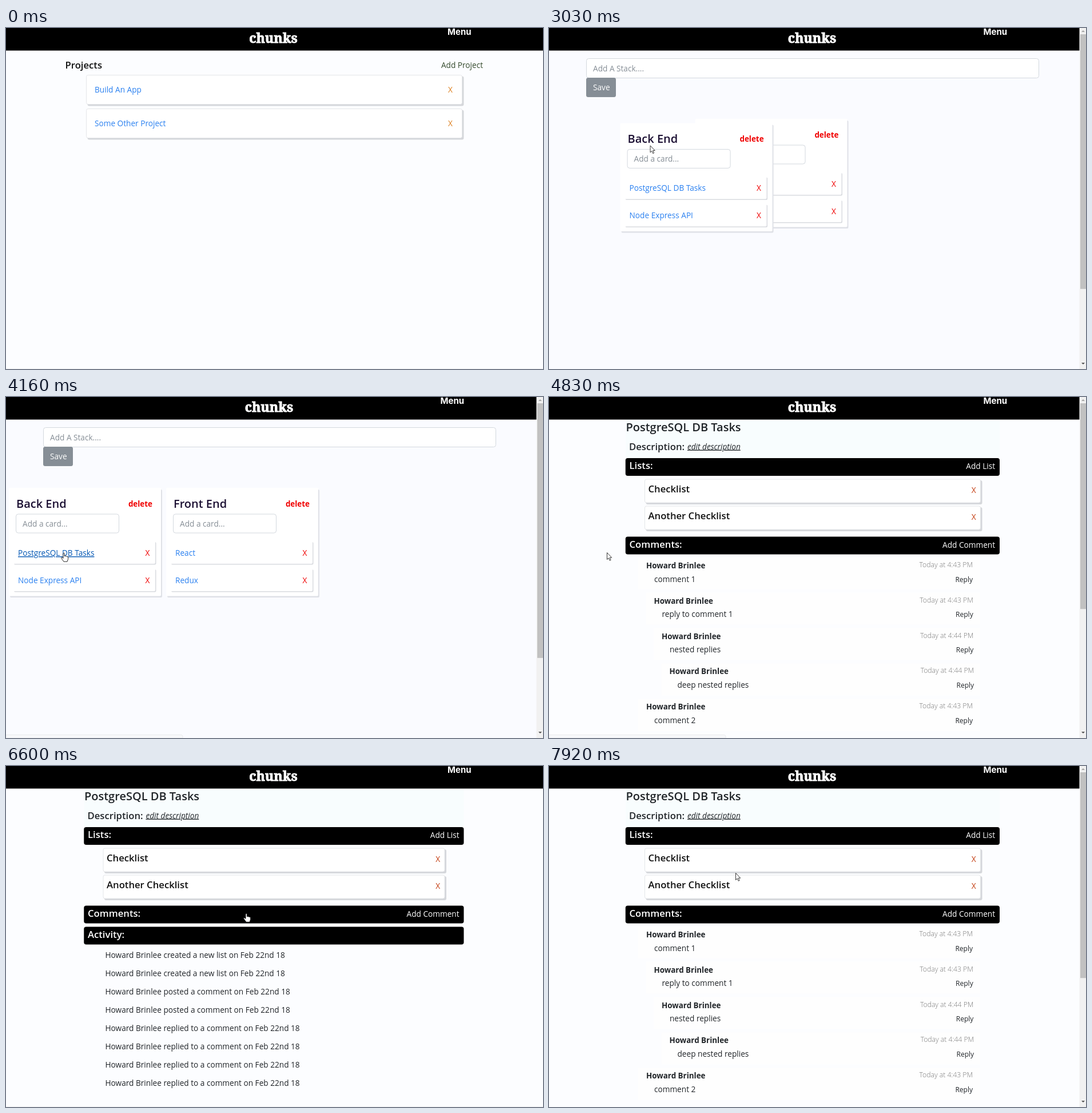
Write an HTML page that moves like this. It is 939 by 597 pixels and loops after 7990 ms.

```html
<!DOCTYPE html>
<html lang="en">
<head>
<meta charset="utf-8">
<title>Project board</title>
<style>
html, body { margin: 0; width: 100%; height: 100%; overflow: hidden; background: #fcfdff; }
svg { display: block; width: 939px; height: 597px; }
text { font: 400 13.65px "Open Sans", "Noto Sans", sans-serif; fill: #212529; white-space: pre; }
text.h { font-weight: 600; font-size: 16.7px; fill: #111; }
text.title { font-size: 20px; fill: #212529; }
text.b { font-weight: 700; font-size: 13.4px; }
text.logo { font: 900 23.2px "Noto Serif", serif; fill: #fff; stroke: #fff; stroke-width: .9px; text-anchor: middle; }
text.menu { font: 700 15px Inter, sans-serif; fill: #fff; }
.end { text-anchor: end; }
.link { fill: #2a80f0; }
.hover { fill: #0056b3; text-decoration: underline; }
.hint { fill: #868e96; }
text.stamp { font-size: 12.2px; font-weight: 300; fill: #777; }
text.reply { font-size: 12px; }
text.edit { font-style: italic; text-decoration: underline; }
</style>
</head>
<body>
<svg id="stage" viewBox="0 0 939 597"></svg>
<script>
const LOOP = 7990;
const PERSON = 'Howard Brinlee';
const stage = document.getElementById('stage');

// Motion: progress of a move between two times, and sums of such moves.
const ramp = (t, start, end) => Math.min(1, Math.max(0, (t - start) / (end - start)));
const easeOut = u => 1 - (1 - u) ** 2;
const mix = (a, b, k) => a + (b - a) * k;

const GRAB = { x: 332, y: 198, start: 2560, drop: 3360, end: 3640 };
const POINTER = [
  { start: 360, end: 460, x: 382, y: 196 },
  { start: 620, end: 770, x: 176, y: 28 },
  { start: 940, end: 1240, x: 181, y: 102 },
  { start: 2090, end: GRAB.start, x: GRAB.x, y: GRAB.y },
  { start: GRAB.start, end: 3260, x: 101, y: 209 },
  { start: 3660, end: 3890, x: 101, y: 272 },
  { start: 4930, end: 5130, x: 265, y: 224 },
  { start: 5130, end: 5360, x: 420, y: 254 },
  { start: 5780, end: 5990, x: 420, y: 257 },
  { start: 7760, end: 7920, x: 326, y: 187 }
];

function pointer(t) {
  return POINTER.reduce((p, move) => {
    const k = ramp(t, move.start, move.end);
    return { x: mix(p.x, move.x, k), y: mix(p.y, move.y, k) };
  }, { x: 440, y: 235 });
}

const overProject = t => t >= 1200 && t < 1780;
const overTask = t => t >= 3890 && t < 4590;
const overComments = t => t >= 5600 && t < 7840;

const openness = t => 1 - easeOut(ramp(t, 6230, 6580)) + easeOut(ramp(t, 7200, 7650));
const statusAlpha = t =>
  ramp(t, 1390, 1540) - ramp(t, 2100, 2300) + ramp(t, 4100, 4160) - ramp(t, 4930, 5130);

// The dragged stack follows the pointer, then settles in the first column.
function dragOffset(t) {
  if (t < GRAB.start) return { x: 0, y: 0 };
  const held = pointer(Math.min(t, GRAB.drop));
  const k = easeOut(ramp(t, GRAB.drop, GRAB.end));
  return { x: mix(held.x - GRAB.x, -275, k), y: mix(held.y - GRAB.y, 0, k) };
}

const text = (x, y, str, cls = '', fill = '') =>
  `<text x="${x}" y="${y}" class="${cls}"${fill && ` style="fill:${fill}"`}>${str}</text>`;
const rect = (x, y, w, h, fill, r = 0, stroke = 'none') =>
  `<rect x="${x}" y="${y}" width="${w}" height="${h}" rx="${r}" fill="${fill}" stroke="${stroke}"/>`;
const move = (x, y, body) => `<g transform="translate(${x} ${y})">${body}</g>`;
const backdrop = fill => rect(0, 0, 939, 597, fill);
const bottomLine = () => rect(0, 596, 939, 1, '#f1f2f4');
const panel = (x, y, w, h) =>
  rect(x + 2.5, y + 2.5, w, h, '#d5d7db', 3) + rect(x + .5, y + .5, w - 1, h - 1, '#fff', 3, '#e4e6e9');
const field = (x, y, w, h, hint) =>
  rect(x + .5, y + .5, w, h, '#fff', 4, '#d3d8de') + text(x + 12, y + h / 2 + 6, hint, 'hint');

function header(wide) {
  return rect(0, 0, 939, 39.5, '#000') +
    text(wide ? 467.5 : 460, 25.5, 'chunks', 'logo') +
    text(wide ? 772 : 759.5, 12, 'Menu', 'menu');
}

function scrollbar(pageHeight) {
  return rect(927.5, 0, 11.5, 597, '#f1f1f1') +
    rect(929, 11, 10, 575 * 597 / pageHeight, '#c1c1c1') +
    '<path d="M931 7l3-3 3 3z" fill="#a3a3a3"/><path d="M931 586h6l-3 3z" fill="#505050"/>';
}

function projects(t) {
  const row = (y, name, hovered) => panel(140, y, 658, 52) +
    text(155, y + 31, name, hovered ? 'link hover' : 'link') + text(773, y + 31, 'X', '', '#dc7f1e');
  return backdrop('#fcfdff') + header(true) +
    text(103.5, 71, 'Projects', 'h') + text(834, 70, 'Add Project', 'end', '#344a2c') +
    row(82, 'Build An App', overProject(t)) + row(141, 'Some Other Project') + bottomLine();
}

function stack(title, cards, hovered) {
  const card = (name, i) => move(0, i * 48,
    rect(14, 254, 248.5, 39.5, '#d9dbe0', 2) + rect(12, 252, 249, 40, '#fff', 2) +
    text(21, 278, name, hovered && !i ? 'link hover' : 'link') +
    text(243.5, 278, 'X', '', '#f00000'));
  return rect(7, 162, 266, 189, '#dfe1e7', 2) + rect(5, 159, 266, 189.5, '#fff', 2) +
    text(18, 194, title, 'h title', '#1c1033') + text(256, 192, 'delete', 'b end', '#f00000') +
    field(17, 204.5, 180, 33, 'Add a card...') + cards.map(card).join('');
}

function board(t) {
  const drag = dragOffset(t);
  const shift = t < GRAB.end ? 266.5 * easeOut(ramp(t, 2880, 3080)) : 275;
  return backdrop('#fafbff') + header(false) +
    field(65, 53, 791, 34, 'Add A Stack....') +
    rect(65, 87, 52, 34, '#868e96', 3.5) + text(77, 109, 'Save', '', '#fff') +
    move(shift, 0, stack('Front End', ['React', 'Redux'])) +
    move(275 + drag.x, drag.y, stack('Back End', ['PostgreSQL DB Tasks', 'Node Express API'], overTask(t))) +
    scrollbar(770);
}

const COMMENTS = ['comment 1', 'reply to comment 1', 'nested replies', 'deep nested replies', 'comment 2'];
const ACTIONS = ['created a new list', 'created a new list', 'posted a comment', 'posted a comment',
  ...Array(4).fill('replied to a comment')];

function details(t) {
  const loading = t < 4750;
  const unfolded = loading ? 0 : 370 * openness(t);
  const activityY = 282 + unfolded;
  const pageHeight = 583 + unfolded;
  const wide = pageHeight < 597;
  const left = wide ? 136.5 : 134;
  const right = wide ? 800.5 : 788;
  const width = right - left;

  const bar = (y, name, action = '') => rect(left - .25, y - .5, width + .25, 31, '#000', 4) +
    text(left + 6.5, y + 18.5, name, 'h', '#fff') + text(right - 8, y + 18.5, action, 'end', '#fff');
  const list = (y, name) => panel(left + 33, y, width - 66, 42) +
    text(left + 39.5, y + 23.5, name, 'h') + text(right - 41.5, y + 24, 'X', 'end', '#c33c10');
  const comment = (body, i) => {
    const depth = i % 4;
    const x = left + 36 + depth * 13.5;
    const end = right - 47 + depth * .7;
    return move(0, i * 61.8,
      rect(x - 14, 281, right - 20 - x, 56, '#fefefe') +
      text(x, 300, PERSON, 'b') + text(x + 14, 323.5, body) +
      text(end, 298, `Today at 4:${depth < 2 ? 43 : 44} PM`, 'stamp end') +
      text(end, 323.5, 'Reply', 'reply end'));
  };
  const action = (what, i) =>
    text(left + 37, activityY + 54 + i * 32, `${PERSON} ${what} on Feb 22nd 18`);

  return backdrop('#fcfdff') + rect(left, 39, width, 68, '#f8fdfe') + header(wide) +
    text(left + .5, 60, 'PostgreSQL DB Tasks', 'h title') +
    text(left + 6, 93, 'Description:', 'h', '#212529') +
    text(left + 108, 91.5, 'edit description', 'edit') +
    bar(107.5, 'Lists:', 'Add List') + list(143.5, 'Checklist') + list(190.5, 'Another Checklist') +
    bar(245, 'Comments:', 'Add Comment') +
    `<clipPath id="fold"><rect x="0" y="275" width="939" height="${unfolded}"/></clipPath>` +
    `<g clip-path="url(#fold)">${COMMENTS.map(comment).join('')}</g>` +
    bar(activityY, 'Activity:') + (loading ? '' : ACTIONS.map(action).join('')) +
    (wide ? bottomLine() : scrollbar(pageHeight));
}

function status(t) {
  return `<path d="M0 591.5H306q3 0 3 3V597H0z" fill="#f8f9fb" stroke="#e9ebee" opacity="${statusAlpha(t)}"/>`;
}

function cursor(t) {
  if (t < 370) return '';
  const { x, y } = pointer(t);
  const hand = overProject(t) || overTask(t) || overComments(t);
  return hand
    ? move(x - 5, y + .7, '<path d="M4 2q0-1.5 1.2-1.5T6.4 2v4q1-.8 2 .2 1-.7 2 .4 2-.4 2.2 1.4v3l-1.6 4.5H5L1 10Q0 8 1.5 7.8L4 9.6z" fill="#fff" stroke="#111" stroke-width=".9"/>')
    : move(x, y, '<path d="M.5.5v12l2.7-2.5 2 4.3 1.9-.9-2-4.2h3.6z" fill="#fff" stroke="#222" stroke-width=".9"/>');
}

const origin = performance.now();
let shown = '';
function draw() {
  const t = (performance.now() - origin) % LOOP;
  const scene = t < 1710 ? projects : t < 4590 ? board : details;
  const markup = scene(t) + status(t) + cursor(t);
  if (markup !== shown) stage.innerHTML = shown = markup;
  requestAnimationFrame(draw);
}
draw();
</script>
</body>
</html>
```
